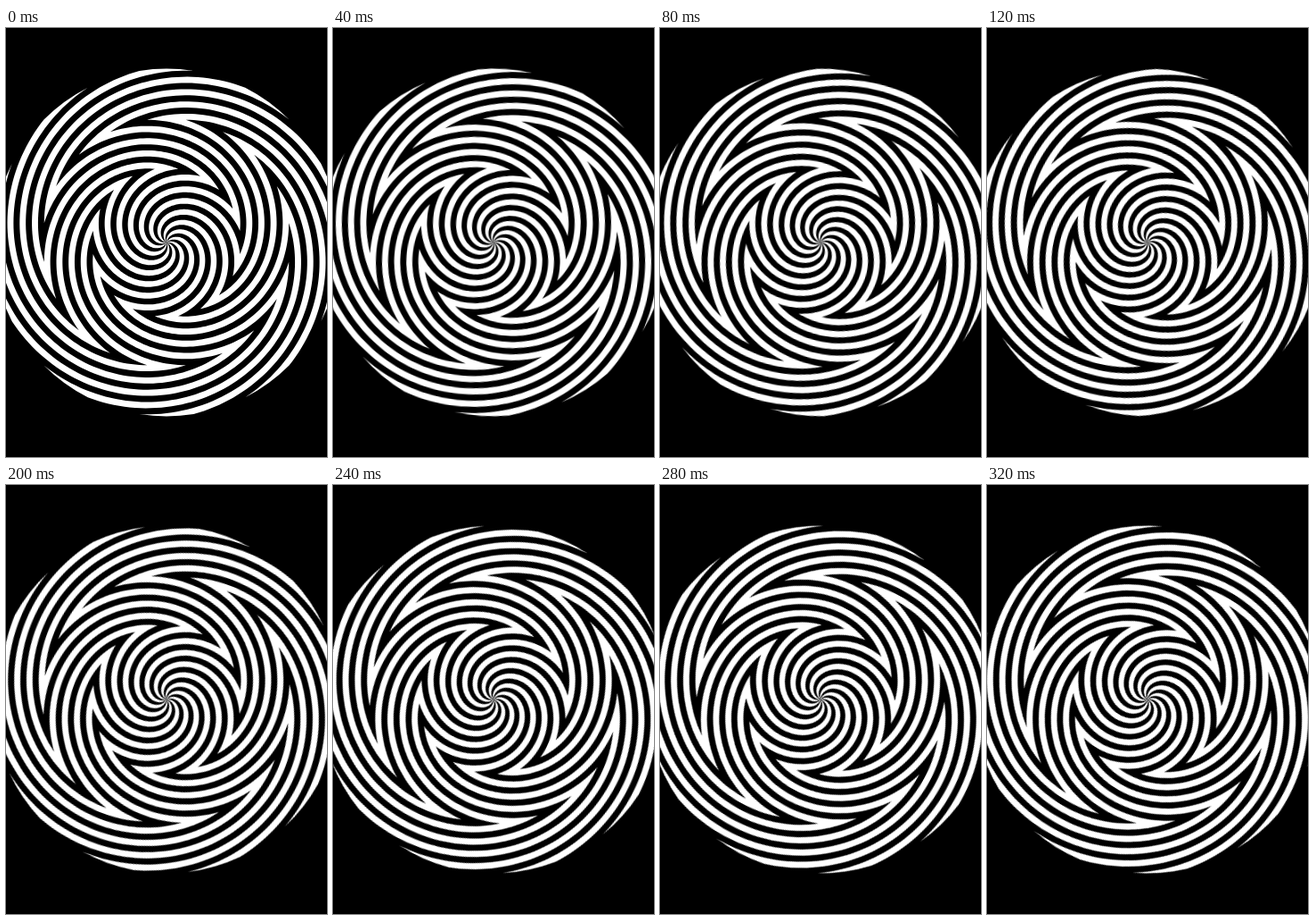
Animation, 360 px wide and 480 px high, one loop 360 ms. Source, as an HTML page:

```html
<!DOCTYPE html>
<html lang="en">
<head>
<meta charset="utf-8">
<title>Spiral rings</title>
<style>
  html, body { margin: 0; width: 100%; height: 100%; overflow: hidden; background: #000; }
  svg { display: block; width: 100%; height: 100%; }
  #disc {
    fill: #fff;
    transform-origin: 0 0;
    animation: turn 360ms steps(9) infinite;
  }
  /* One arm spacing per loop, so the loop closes seamlessly. */
  @keyframes turn { to { transform: rotate(36deg); } }
</style>
</head>
<body>
<svg viewBox="0 0 360 480">
  <g transform="translate(180 240)"><path id="disc"/></g>
</svg>
<script>
  const ARMS = 10;
  const SPACING = 360 / ARMS;
  const HALF_WIDTH = SPACING / 4;
  const TURNS = 14;              // stripes from centre to rim
  const PITCH = 194.5 / TURNS;   // radial distance between stripes
  const STEPS_PER_TURN = 20;

  // The twist reverses at 6 and 10 stripes from the centre.
  function twist(u) {
    if (u < 6) return SPACING * u;
    if (u < 10) return SPACING * (12 - u);
    return SPACING * (u - 8);
  }

  // Angles run clockwise from the top.
  function point(u, degrees) {
    const a = degrees * Math.PI / 180;
    const r = u * PITCH;
    return `${(r * Math.sin(a)).toFixed(2)} ${(-r * Math.cos(a)).toFixed(2)}`;
  }

  function armPath(start) {
    const leading = [];
    const trailing = [];
    for (let i = 0; i <= TURNS * STEPS_PER_TURN; i++) {
      const u = i / STEPS_PER_TURN;
      const angle = start + twist(u);
      leading.push(point(u, angle + HALF_WIDTH));
      trailing.unshift(point(u, angle - HALF_WIDTH));
    }
    const rim = TURNS * PITCH;
    return `M${leading.join('L')}A${rim} ${rim} 0 0 0 ${trailing.join('L')}Z`;
  }

  const arms = Array.from({ length: ARMS }, (_, i) => armPath(i * SPACING));
  document.getElementById('disc').setAttribute('d', arms.join(''));
</script>
</body>
</html>
```
